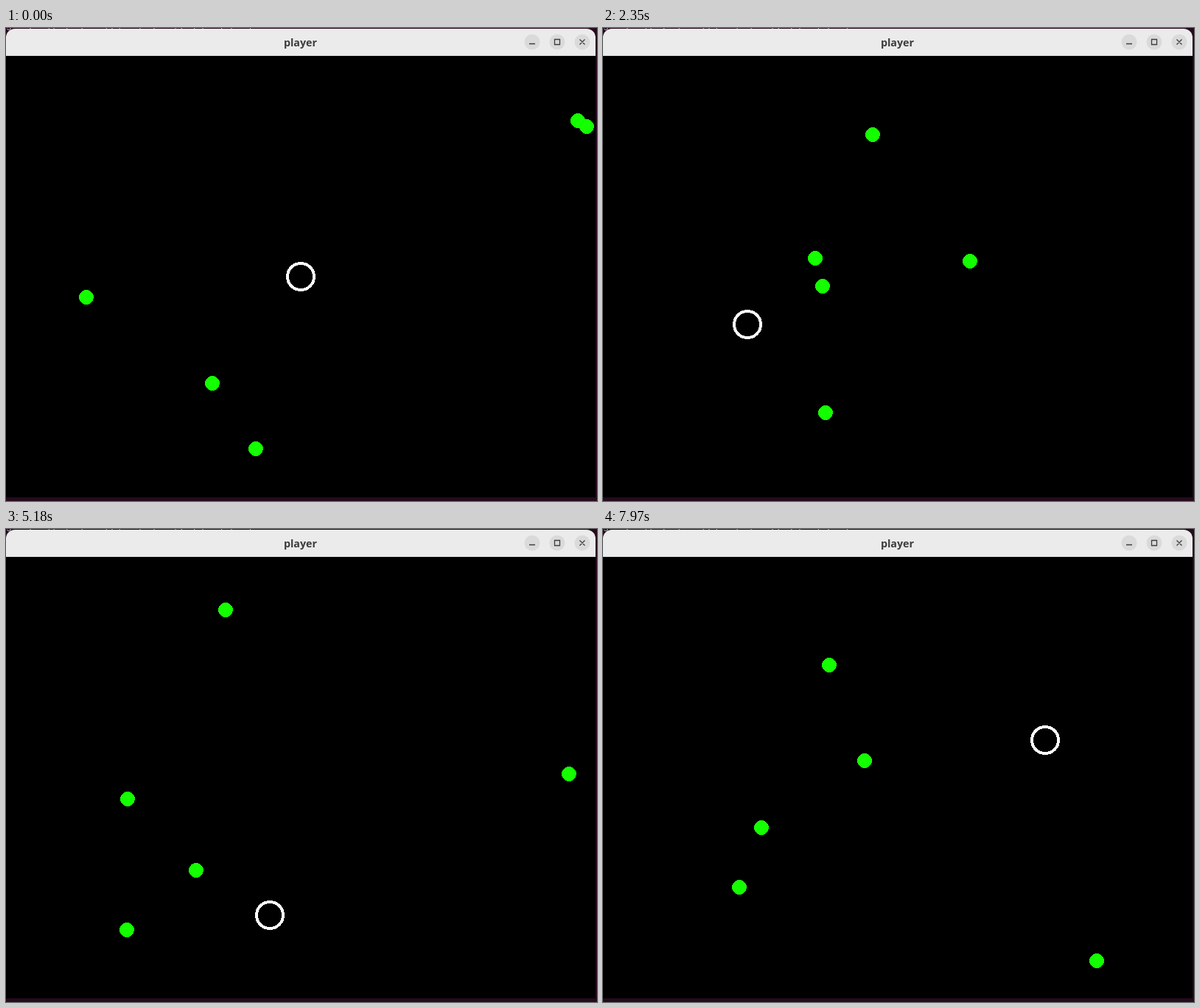
Write an HTML page that moves like this. It is 802 px wide and 643 px high and loops after 8000 ms.

```html
<!DOCTYPE html>
<html lang="en">
<head>
<meta charset="utf-8">
<title>player</title>
<style>
  html, body { margin: 0; width: 100%; height: 100%; overflow: hidden; background: #260a1e; }
  svg { display: block; }
  .behind { font: 13px "Liberation Mono", monospace; fill: #b4b4b4; }
  .title { font: bold 14.3px "Open Sans", sans-serif; fill: #3d3d3d; text-anchor: middle; }
  .icon { fill: none; stroke: #3d3d3d; stroke-width: 1.3; }
  #balls, #ring { shape-rendering: crispEdges; }
</style>
</head>
<body>
<svg width="802" height="643" viewBox="0 0 802 643">
  <rect width="802" height="643" fill="#260a1e"/>
  <text class="behind" x="0" y="0">group by, jump key(game, query) gap by play</text>
  <rect y="37" width="800" height="601"/>
  <path d="M0 38V13A12 12 0 0 1 12 1H788A12 12 0 0 1 800 13V38Z" fill="#ebebeb"/>
  <rect y="37" width="800" height="1" fill="#d8d8d8"/>
  <text class="title" x="399.5" y="25">player</text>
  <g fill="#dadada">
    <circle cx="714" cy="19" r="10.5"/>
    <circle cx="748" cy="19" r="10.5"/>
    <circle cx="782" cy="19" r="10.5"/>
  </g>
  <path class="icon" d="M710 21.5h8M744.5 15.5h7v7h-7zM778.5 15.5l7 7m0-7l-7 7"/>
  <g id="balls" fill="#14ff00"></g>
  <circle id="ring" r="18" fill="none" stroke="#fff" stroke-width="4"/>
</svg>
<script>
const LOOP = 8000, STEPS = 238, STEP = LOOP / STEPS, LEAD = 8;
const BOUNDS = { x: [9.6, 789.7], y: [46.8, 629] };

// start position and velocity in px per second
const balls = [
  { x: 776, y: 126, vx: -118.2, vy: 81 },
  { x: 788, y: 134, vx: 181, vy: -78.75 },
  { x: 109, y: 366, vx: -165, vy: -6.4 },
  { x: 280, y: 483, vx: 3.4, vy: -72.15 },
  { x: 339, y: 572, vx: -15.56, vy: -20.83 }
];

// time in ms, x, y
const path = [
  [0, 400, 338], [1223, 400, 338], [1440, 400, 403], [2350, 196, 403],
  [3930, 392, 261], [5180, 358, 526], [6080, 178, 477], [7970, 601, 287]
];

const ring = document.getElementById("ring");
const group = document.getElementById("balls");
for (const ball of balls) {
  ball.node = document.createElementNS("http://www.w3.org/2000/svg", "circle");
  ball.node.setAttribute("r", 10);
  group.append(ball.node);
}

function bounce(value, [low, high]) {
  const span = high - low;
  const turn = (((value - low) % (2 * span)) + 2 * span) % (2 * span);
  return low + (turn > span ? 2 * span - turn : turn);
}

function along(time) {
  const next = path.findIndex(point => point[0] > time);
  if (next < 0) return path[path.length - 1].slice(1);
  const [t0, x0, y0] = path[next - 1], [t1, x1, y1] = path[next];
  const part = (time - t0) / (t1 - t0);
  return [x0 + (x1 - x0) * part, y0 + (y1 - y0) * part];
}

function place(node, x, y) {
  node.setAttribute("cx", Math.round(x));
  node.setAttribute("cy", Math.round(y));
}

function draw(now) {
  const time = Math.floor(((now % LOOP) + LEAD) / STEP) % STEPS * STEP;
  const seconds = time / 1000;
  for (const { node, x, y, vx, vy } of balls) {
    place(node, bounce(x + vx * seconds, BOUNDS.x), bounce(y + vy * seconds, BOUNDS.y));
  }
  place(ring, ...along(time));
}

let start;
function tick(now) {
  start ??= now;
  draw(now - start);
  requestAnimationFrame(tick);
}
draw(0);
requestAnimationFrame(tick);
</script>
</body>
</html>
```
